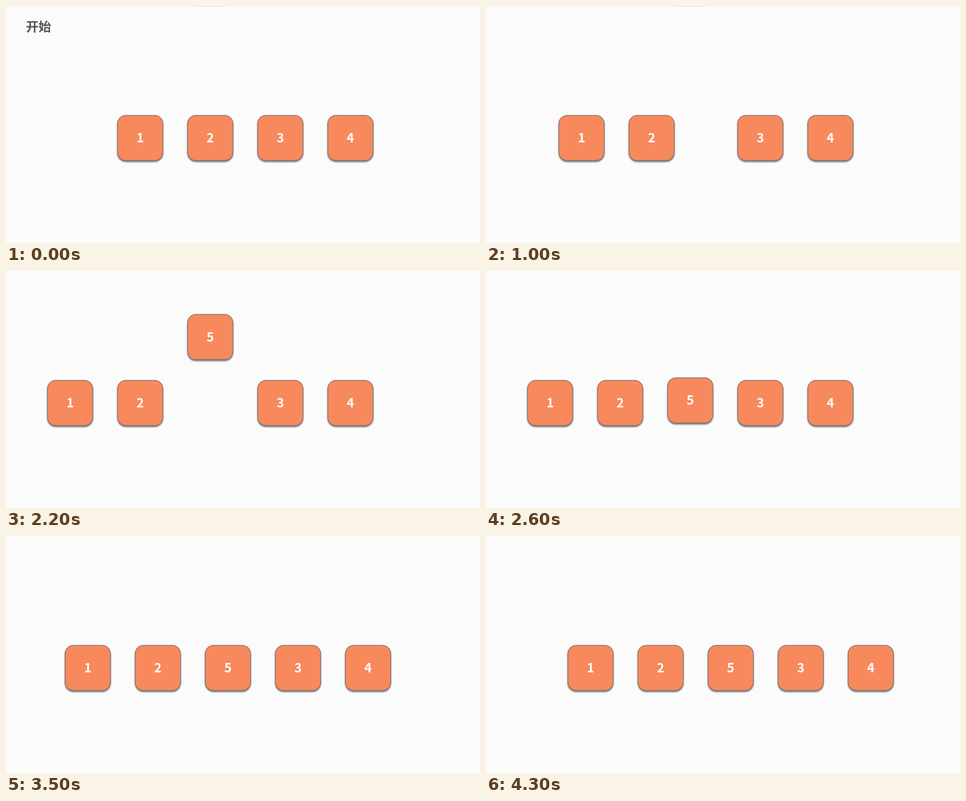
An HTML page for the animation above (4500 ms loop, 1056 by 530 pixels).

```html
<!DOCTYPE html>
<html lang="zh-CN">
<head>
<meta charset="utf-8">
<title>开始</title>
<style>
  html, body { margin: 0; width: 100%; height: 100%; overflow: hidden; background: #fbfbfb; }
  svg { display: block; }
  text { font: 700 28px "Noto Sans CJK SC", "Noto Sans CJK", "Noto Sans CJK JP", sans-serif; }
  .block text { fill: #fff; text-anchor: middle; }
  .block rect { fill: #f7895d; stroke: #7b716c; stroke-width: 1.5; }
</style>
</head>
<body>
<svg id="stage" width="1056" height="530" viewBox="0 0 1056 530">
  <defs>
    <filter id="shadow" x="-20%" y="-20%" width="140%" height="140%" color-interpolation-filters="sRGB">
      <feDropShadow dx="0" dy="3" stdDeviation="1.8" flood-color="#000" flood-opacity=".5"/>
    </filter>
  </defs>
  <text id="heading" x="44.5" y="57" fill="#555">开始</text>
</svg>
<script>
const LOOP = 4500, TICK = 100, GAP = 156.1, SIZE = 101;
const ROW_Y = 295, ABOVE_Y = -55;
const HEADING_END = 600;

// start and duration in ms
const SPREAD = { at: 680, dur: 1000 };
const DROP = { at: 1932, dur: 800 };
const SHIFT = { at: 3237, dur: 1000 };

const NS = "http://www.w3.org/2000/svg";
const stage = document.getElementById("stage");
const heading = document.getElementById("heading");

function add(parent, tag, attrs) {
  const el = document.createElementNS(NS, tag);
  for (const key in attrs) el.setAttribute(key, attrs[key]);
  return parent.appendChild(el);
}

function makeBlock(label) {
  const g = add(stage, "g", { class: "block" });
  add(g, "rect", { x: -SIZE / 2, y: -SIZE / 2, width: SIZE, height: SIZE, rx: 18.5, filter: "url(#shadow)" });
  add(g, "text", { x: 0, y: 10 }).textContent = label;
  return g;
}

// cubic-bezier(.25, .1, .25, 1)
function ease(x) {
  if (x <= 0) return 0;
  if (x >= 1) return 1;
  let lo = 0, hi = 1;
  for (let i = 0; i < 24; i++) {
    const t = (lo + hi) / 2;
    if (0.75 * t * (1 - t) + t ** 3 < x) lo = t; else hi = t;
  }
  const t = lo, u = 1 - t;
  return 0.3 * u * u * t + 3 * u * t * t + t ** 3;
}

const progress = (step, time) => ease((time - step.at) / step.dur);
const place = (el, x, y) => el.setAttribute("transform", `translate(${x.toFixed(2)} ${y.toFixed(2)})`);

const [one, two, three, four, five] = ["1", "2", "3", "4", "5"].map(makeBlock);

function draw(time) {
  const spread = GAP * progress(SPREAD, time);
  const left = 299 + 90 * progress(SHIFT, time);
  heading.style.visibility = time < HEADING_END ? "visible" : "hidden";
  place(one, left - spread, ROW_Y);
  place(two, left + GAP - spread, ROW_Y);
  place(three, left + GAP * 2, ROW_Y);
  place(four, left + GAP * 3, ROW_Y);
  place(five, left + GAP, ABOVE_Y + (ROW_Y - ABOVE_Y) * progress(DROP, time));
}

const begin = performance.now();
function loop() {
  const time = (performance.now() - begin) % LOOP;
  draw(Math.floor(time / TICK) * TICK);
  requestAnimationFrame(loop);
}
loop();
</script>
</body>
</html>
```
